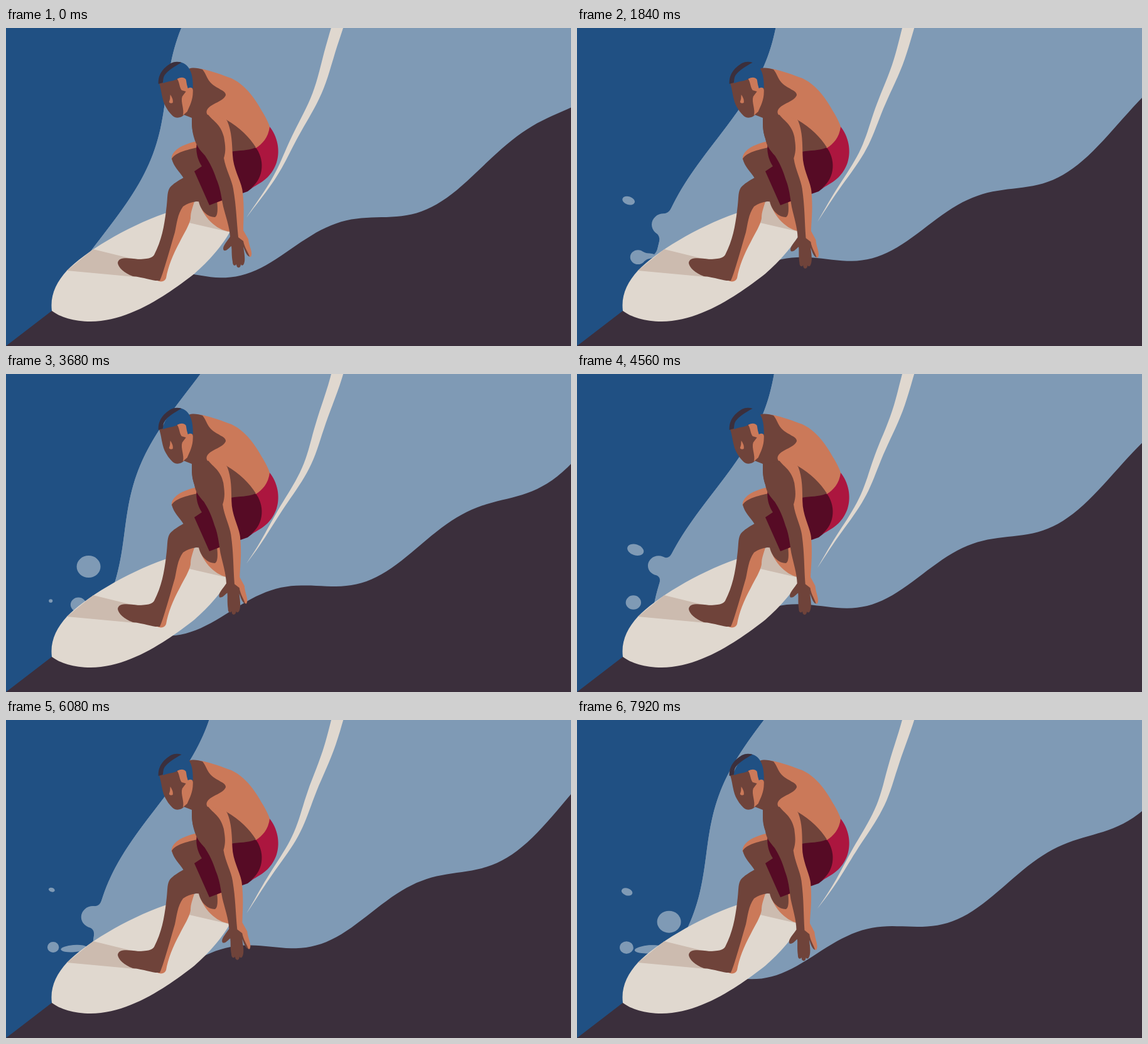
Recreate the animation shown at these times as an HTML page. Size 900 px wide and 506 px high, loop 8000 ms.

```html
<!DOCTYPE html>
<html lang="en">
<head>
<meta charset="utf-8">
<title>Surfer</title>
<style>
  html, body { margin: 0; width: 100%; height: 100%; overflow: hidden; background: #205083; }
  svg { display: block; width: 100vw; height: 100vh; }
  .water { fill: #7f9ab5; }
  .hill { fill: #3b2f3c; }
  .foam { fill: #e0d8cf; }
  .cast { fill: #ccbbaf; }
  .skin { fill: #cb7959; }
  .shade { fill: #6f433a; }
  .red { fill: #ac163f; }
  .wine { fill: #560b25; }
  .blue { fill: #205083; }
</style>
</head>
<body>
<svg viewBox="0 0 900 506">
  <defs>
    <filter id="goo" filterUnits="userSpaceOnUse" x="-30" y="-30" width="960" height="566" color-interpolation-filters="sRGB">
      <feGaussianBlur stdDeviation="6" result="soft"/>
      <feColorMatrix in="soft" values="1 0 0 0 0  0 1 0 0 0  0 0 1 0 0  0 0 0 15 -7" result="joined"/>
      <feMerge><feMergeNode in="joined"/><feMergeNode in="SourceGraphic"/></feMerge>
    </filter>
  </defs>

  <path id="water" class="water" filter="url(#goo)"/>
  <path id="hill" class="hill"/>
  <path id="streak" class="foam"/>

  <g id="board">
    <path class="foam" d="M73 450C70 425 80 405 97 386C125 357 190 317 253 295L310 274L358 322C346 345 322 372 300 391C265 418 200 467 135 467C108 467 86 460 73 450Z"/>
    <path class="cast" d="M139 352L200 367L240 368L205 396L97 386Z"/>
    <path class="cast" d="M292 310L357 325L352 300L312 272L297 278Z"/>
  </g>

  <g id="legs">
    <path class="skin" d="M308 278C314 300 334 322 357 324L354 290L340 260Z"/>
    <path class="shade" d="M306 264C305 285 318 301 333 301C339 297 337 280 334 260Z"/>
    <path class="skin" d="M264 210C261 196 282 184 306 180L310 196L275 212Z"/>
    <path class="shade" d="M264 208C270 198 288 194 305 190L316 222L300 236L283 239C276 228 267 221 264 208Z"/>
    <path class="skin" d="M300 274L278 284C270 300 271 320 258 345C250 365 246 385 239 401C246 405 253 404 255 398C258 380 266 360 277 340C284 326 292 314 294 303C294 292 298 284 300 276Z"/>
    <path class="shade" d="M283 238L301 227L326 270L320 277L303 276Q290 278 282 284C273 296 272 312 269 325C263 345 260 357 254 376C251 386 248 395 245 402C233 403 222 397 202 395C188 390 179 381 178 374C179 364 194 366 210 368C224 368 233 366 236 361C248 338 252 315 255 291C258 270 256 262 261 254C266 248 274 243 283 238Z"/>
  </g>

  <g id="body">
    <path class="wine" d="M304 183C302 194 304 208 312 220L300 228L324 282L345 274L385 260L404 245L412 215L400 186L350 180Z"/>
    <path class="red" d="M419 156C433 172 437 196 431 214C424 234 412 244 390 255C412 238 412 208 397 189Z"/>
    <path class="skin" d="M300 64C318 64 345 75 359 80C387 93 402 123 410 136Q417 148 420 157C418 174 408 185 398 191L352 162L320 142L300 100Z"/>
    <path class="shade" d="M351 146C372 158 388 174 398 190C384 196 372 194 358 197Z"/>
    <path class="shade" d="M291 65C298 62 306 64 313 66C319 73 320 82 328 89C337 97 351 100 350 107C346 117 327 120 321 129C316 137 324 142 335 150L345 180L303 184C296 168 296 155 296 143L283 138L290 110Z"/>
  </g>

  <g id="arm">
    <path class="skin" d="M323 138Q342 141 352 147C360 165 360 185 361 202C362 226 376 245 377 262C380 288 378 305 378 322L386 336C387 348 394 357 390 364C386 365 384 355 377 347L364 335L340 220Z"/>
    <path class="shade" d="M296 145L322 138C330 148 342 153 347 173C349 185 351 194 347 207C350 225 360 242 362 256C367 285 367 305 370 333L378 339C380 350 386 357 388 364C383 362 381 355 378 348C380 360 382 371 378 377Q375 379 374 376C374 383 367 383 367 376C364 380 361 377 361 372C359 361 360 354 359 347C355 350 352 355 347 354C343 349 352 340 357 332C356 316 350 300 346 284C343 270 342 256 335 240C330 225 325 215 317 203C309 194 303 188 301 176C296 164 296 154 296 145Z"/>
  </g>

  <g id="head" transform="translate(.7 0)">
    <path class="shade" d="M243 87L254 78L280 72L290 94L290 132L283 138C278 144 268 144 264 139C258 133 255 128 252 122C247 110 247 98 243 87Z"/>
    <path class="blue" d="M249 88C249 74 262 62 276 54C290 57 298 70 297 96L288 97L284 80L273 80C268 85 258 84 249 88Z"/>
    <path class="skin" d="M272 81Q281 76 286 82Q287 90 289 96Q298 92 297 102C297 114 292 124 288 133L281 139C284 130 277 118 280 109L286 101L279 99C275 93 276 87 272 81Z"/>
    <path class="skin" d="M261 106Q266 113 265 119Q261 121 259 118Q261 113 261 106Z"/>
    <path class="hill" d="M242 89C241 72 252 62 262 56Q270 52 279 55C266 62 257 68 252 75C249 80 250 84 249 87Z"/>
  </g>
</svg>

<script>
const LOOP = 8000, STEP = 80, SWELL = 1375, SPLASH = 640;
const el = id => document.getElementById(id);
const [water, hill, streak, arm] = ["water", "hill", "streak", "arm"].map(el);
const wave = turns => Math.cos(Math.PI * 2 * turns);
const mix = (a, b, f) => a + (b - a) * f;
const line = pts => "M" + pts.map(p => p[0].toFixed(1) + " " + p[1].toFixed(1)).join("L");

function range(from, to, step, fn) {
  const out = [];
  for (let v = from; v <= to; v += step) out.push(fn(v));
  return out;
}

// Drops fly from a to b, slowing by `drag`, and shrink late in life by `hold`.
const drops = [
  { start: 2560, life: 400, a: [100, 283], b: [66, 267], size: [14, 9], tilt: 18, drag: 1, hold: 2 },
  { start: 2040, life: 660, a: [167, 341], b: [130, 305], size: [19, 17.5], tilt: 0, drag: 4, hold: 24 },
  { start: 2350, life: 740, a: [122, 368], b: [71, 361], size: [12.5, 11.5], tilt: 0, drag: 2, hold: 4 },
  { start: 2700, life: 300, a: [130, 367], b: [104, 363], size: [24, 6.5], tilt: -4, drag: 2, hold: 4 }
];

function dropPath(d, age) {
  const u = age / d.life;
  if (u < 0 || u >= 1) return "";
  const [x, y] = [0, 1].map(i => mix(d.b[i], d.a[i], (1 - u) ** d.drag));
  const [rx, ry] = d.size.map(r => r * (1 - u ** d.hold));
  const turn = d.tilt * Math.PI / 180, c = Math.cos(turn) * rx, s = Math.sin(turn) * rx;
  const arc = `a${rx} ${ry} ${d.tilt} 0 0 `;
  return `M${x - c} ${y - s}${arc}${2 * c} ${2 * s}${arc}${-2 * c} ${-2 * s}Z`;
}

// A first burst of three splashes, then a steady rhythm for each drop.
function splash(d, t) {
  const shape = s => dropPath(d, t - s);
  return [...range(350, 1630, SPLASH, shape), ...range(d.start, t, SPLASH, shape)].join("");
}

function waterPath(t) {
  const edge = range(-40, 440, 8, y =>
    [302 - .45 * y + 23 * wave(t / SWELL - .48 + .0022 * y), y]);
  return line([...edge, [95, 560], [960, 560], [960, -40]]) + "Z"
    + drops.map(d => splash(d, t)).join("");
}

function hillPath(t) {
  const top = range(110, 910, 8, x => {
    const d = x - 300;
    const base = 392 - .2 * d - .00034 * d * d - 23 * (d / 600) ** 6;
    return [x, base + 18.5 * wave(x / 300 - t / SWELL - .25)];
  });
  return line([[0, 506], [73, 450], ...top, [910, 510], [0, 510]]) + "Z";
}

// The streak is one cubic curve, thinning to a tip.
function streakPath(t) {
  const p = t / SWELL, tipY = 304 + 4.5 * wave(p - .33);
  const cubic = (a, b, c, d, u) => {
    const v = 1 - u;
    return a * v ** 3 + 3 * b * v * v * u + 3 * c * v * u * u + d * u ** 3;
  };
  const side = s => range(0, 40, 1, i => {
    const u = i / 40, y = cubic(-5, 152, 205, tipY, u);
    const sway = 3 * Math.sin(Math.PI * u) * wave(p - .35 + (y - 200) / 170);
    return [cubic(529, 484, 450, 383, u) + sway + s * 9.7 * (1 - u) ** .9, y];
  });
  return line([...side(-1), ...side(1).reverse()]) + "Z";
}

function draw(t) {
  water.setAttribute("d", waterPath(t));
  hill.setAttribute("d", hillPath(t));
  streak.setAttribute("d", streakPath(t));
  const sway = -4.75 + 4.75 * wave(2 * t / SWELL);
  arm.setAttribute("transform",
    `translate(0 150) matrix(1 0 ${sway / 230} ${1 - sway / 1100} 0 0) translate(0 -150)`);
}

const begin = performance.now();
function tick() {
  const t = (performance.now() - begin) % LOOP;
  draw(Math.floor(t / STEP) * STEP);
  requestAnimationFrame(tick);
}
draw(0);
requestAnimationFrame(tick);
</script>
</body>
</html>
```
